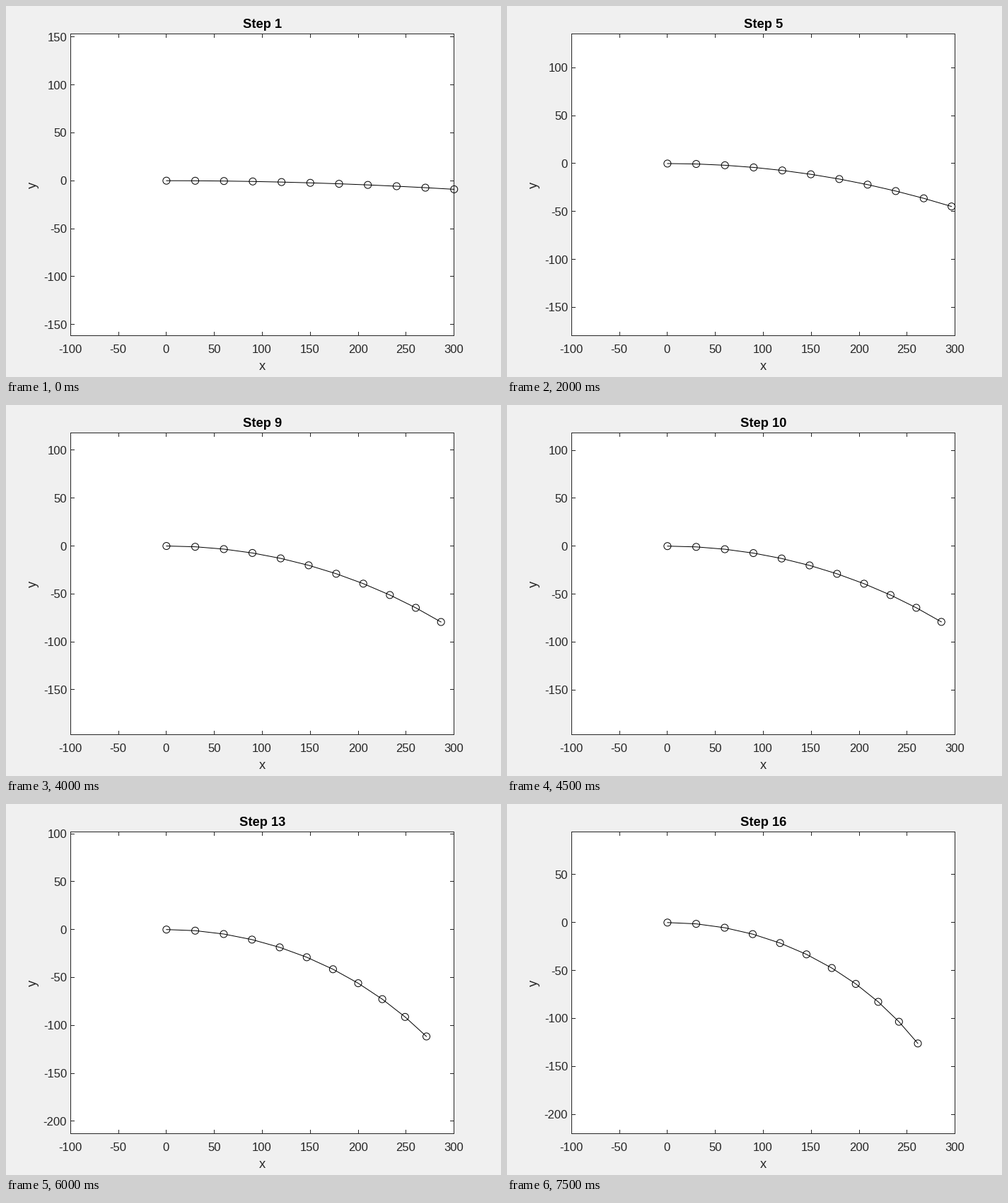
Write a matplotlib script that moves like this. It is 700 px wide and 525 px high and loops after 8 s.

```python
import numpy as np
import matplotlib.pyplot as plt
from matplotlib.animation import FuncAnimation

W, H, DPI = 700, 525, 100
PX = 72 / DPI                                # points per pixel
LEFT, RIGHT, TOP, BOTTOM = 91, 633, 39, 466  # pixel columns and rows of the frame
SCALE = 0.775 * W / 400                      # pixels per data unit
X0, MID = 91.25 + 100 * SCALE, 253.3
TICK = 5
LENGTH, STEPS = 300, 16
GREY = "#262626"

plt.rcParams["font.family"] = "Liberation Sans"
fig = plt.figure(figsize=(W / DPI, H / DPI), dpi=DPI, facecolor="#f0f0f0")
ax = fig.add_axes([0, 0, 1, 1])
ax.set(xlim=(0, W), ylim=(H, 0))
ax.axis("off")


def label(x, y, text, size=16.67, color=GREY, **kw):
    kw = {"ha": "center", "va": "baseline", **kw}
    return ax.text(x, y, text, fontsize=size * PX, color=color, **kw)


def crisp(x=(), y=()):
    """One-pixel line; whole coordinates snap to that pixel's centre."""
    line, = ax.plot(x, y, color=GREY, lw=PX, aa=False, snap=True,
                    solid_capstyle="butt", solid_joinstyle="miter")
    return line


def set_segments(line, segments):
    """Show separate straight pieces (x1, y1, x2, y2) with one line."""
    xs, ys = [], []
    for x1, y1, x2, y2 in segments:
        xs += [x1, x2, np.nan]
        ys += [y1, y2, np.nan]
    line.set_data(xs, ys)


# Plot area, x axis and fixed labels
ax.add_patch(plt.Rectangle((LEFT, TOP), RIGHT - LEFT, BOTTOM - TOP,
                           fc="white", ec="none", aa=False))
ticks = []
for v in range(-100, 301, 50):
    x = X0 + v * SCALE
    col = np.floor(x)
    ticks += [(col, BOTTOM, col, BOTTOM - TICK), (col, TOP, col, TOP + TICK)]
    label(x - 0.5, 491, str(v))
set_segments(crisp(), ticks)
y_ticks = crisp()
crisp([LEFT, RIGHT, RIGHT, LEFT, LEFT], [TOP, TOP, BOTTOM, BOTTOM, TOP])
label(362.5, 515, "x", 18.33)
label(47, 253, "y", 18.33, rotation=90, ha="right", va="center")

title = label(363, 31, "", 18.33, "black", weight="bold")
y_labels = {v: label(86, 0, str(v), ha="right") for v in range(-200, 151, 50)}
beam, = ax.plot([], [], color="black", lw=PX)
rings = [ax.add_patch(plt.Circle((0, 0), 5, fc="none", ec="black", lw=PX, zorder=3))
         for _ in range(11)]

u = np.linspace(0, 1, len(rings))


def arc(a):
    """Beam nodes bent to a circular arc with end angle a."""
    return LENGTH / a * np.array([np.sin(a * u), np.cos(a * u) - 1])


def arc_rate(a):
    """Derivative of the arc nodes by the end angle."""
    return LENGTH / a * u * np.array([np.cos(a * u), -np.sin(a * u)]) - arc(a) / a


def angle(load):
    return max(0.12 * load - 0.06, 1e-3)


def nodes(step):
    """Odd steps predict along the tangent, even steps correct to the arc."""
    load = (step + 1) // 2
    a = angle(load)
    if step % 2 == 0:
        return arc(a)
    prev = angle(load - 1)
    return arc(prev) + arc_rate(prev) * (a - prev)


def draw(i):
    step = i + 1
    x, y = nodes(step)
    y0 = MID + y[-1] / 2 * SCALE             # keeps the beam centred vertically
    px, py = X0 + x * SCALE, y0 - y * SCALE
    beam.set_data(px, py)
    for ring, centre in zip(rings, zip(px, py)):
        ring.set_center(centre)
    title.set_text(f"Step {step}")

    marks = []
    for v, text in y_labels.items():
        ty = y0 - v * SCALE
        row = np.floor(ty)
        shown = TOP <= row <= BOTTOM
        text.set_visible(shown)
        if shown:
            text.set_y(np.floor(ty + 6.5))
            marks += [(LEFT, row, LEFT + TICK, row), (RIGHT, row, RIGHT - TICK, row)]
    set_segments(y_ticks, marks)
    return [beam, title, y_ticks, *rings, *y_labels.values()]


anim = FuncAnimation(fig, draw, frames=STEPS, interval=500, repeat=True,
                     repeat_delay=0, blit=False)
plt.show()
```
